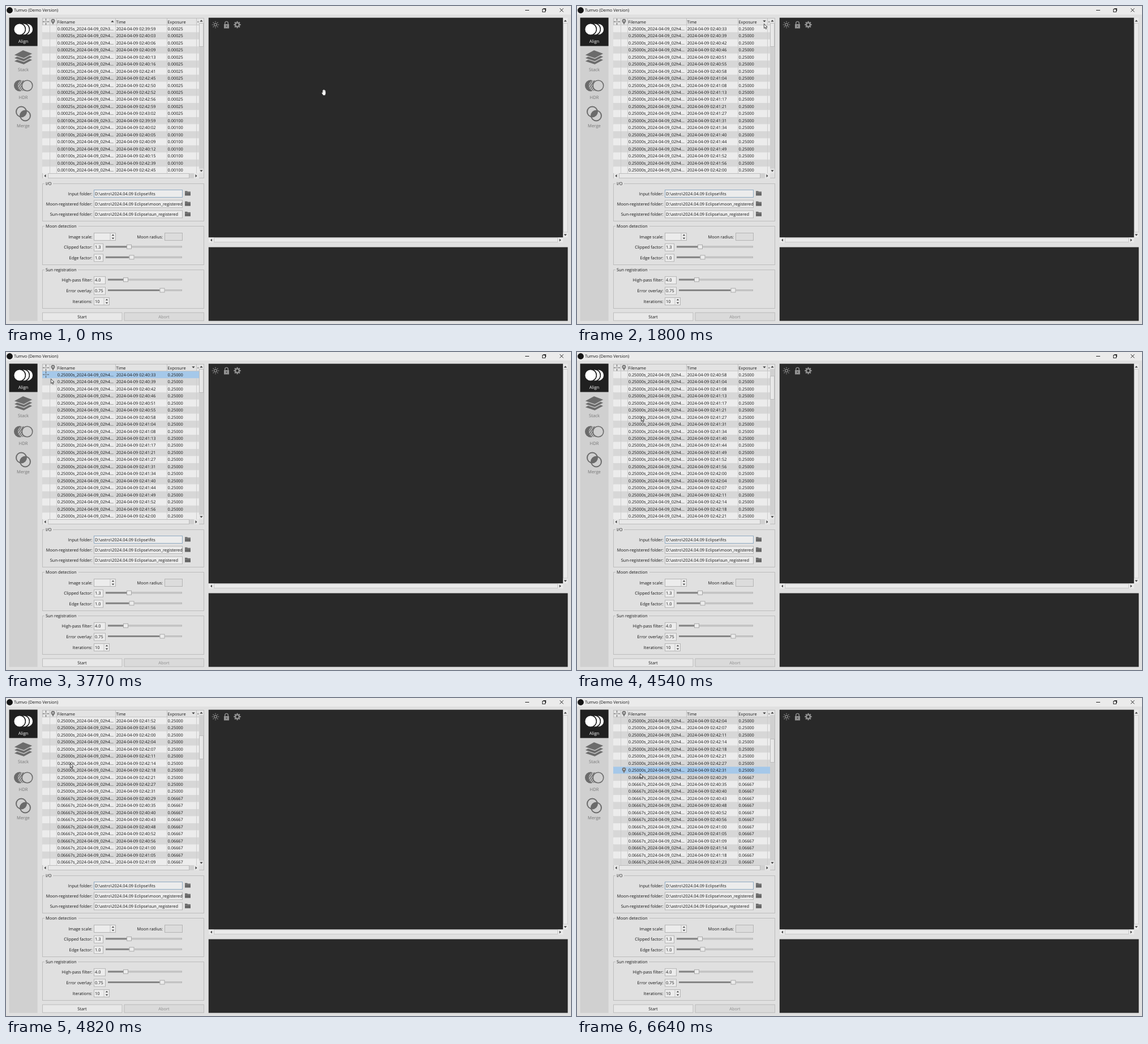
An HTML page with a canvas that plays this animation: 998 px wide and 561 px high, repeating every 6770 ms.

```html
<!DOCTYPE html>
<html lang="en">
<head>
<meta charset="utf-8">
<title>Eclipse alignment</title>
<style>
  html, body { margin: 0; width: 100%; height: 100%; overflow: hidden; background: #e0e0e0; }
  canvas { display: block; width: 100vw; height: 100vh; }
</style>
</head>
<body>
<canvas id="stage"></canvas>
<script>
const W = 998, H = 561, LOOP = 6770;
const canvas = document.getElementById('stage');
const ctx = canvas.getContext('2d');
const ratio = window.devicePixelRatio || 1;
canvas.width = W * ratio;
canvas.height = H * ratio;
ctx.scale(ratio, ratio);
ctx.textRendering = 'geometricPrecision';

const BG = '#e0e0e0', SIDE = '#d0d0d0', DARK = '#292929', INK = '#161616', GREY = '#6b6b6b', LINE = '#bcbcbc';

// Table contents: exposure followed by minutes and seconds of each shot
const shots = (exposure, minutes) => minutes.split(' ').flatMap(group => {
  const [minute, seconds] = group.split(':');
  return seconds.split(',').map(s => ({ exposure, time: `02:${minute}:${s}` }));
});
const ascending = [
  ...shots('0.00025', '39:59 40:03,06,09,13,16 42:41,45,50,52,56,59 43:02'),
  ...shots('0.00100', '39:59 40:02,05,09,12,15 42:39,45')
];
const descending = [
  ...shots('0.25000', '40:33,39,42,46,51,55,58 41:04,08,13,17,21,27,31,34,40,44,49,52,56 42:00,04,07,11,14,18,21,27,31'),
  ...shots('0.06667', '40:29,35,40,43,48,52,56 41:00,05,09,14,18,23')
];

// Pointer path: time, x, y
const path = [
  [0, 557, 147], [70, 553, 145], [700, 334, 40], [1050, 330, 31], [2200, 330, 31],
  [2930, 101, 42], [3000, 92, 42], [3280, 75, 43], [3700, 75, 43], [3770, 79, 47],
  [4330, 113, 114], [4540, 113, 114], [4820, 113, 115], [5090, 113, 120],
  [5400, 103, 138], [5710, 86, 134], [6440, 86, 128], [6640, 111, 133], [LOOP, 111, 133]
];
const scrollTimes = [4400, 4540, 4610, 4680, 4750, 4820, 4950];

function pointerAt(t) {
  const i = Math.max(1, path.findIndex(p => p[0] > t));
  const [t0, x0, y0] = path[i - 1], [t1, x1, y1] = path[i];
  let u = (t - t0) / (t1 - t0);
  if (t1 - t0 > 500) u = u * u * (3 - 2 * u);
  return [x0 + (x1 - x0) * u, y0 + (y1 - y0) * u];
}

function rect(x, y, w, h, fill, stroke) {
  if (fill) { ctx.fillStyle = fill; ctx.fillRect(x, y, w, h); }
  if (stroke) {
    ctx.strokeStyle = stroke;
    ctx.lineWidth = 1;
    ctx.strokeRect(x + .5, y + .5, w - 1, h - 1);
  }
}
function text(str, x, centerY, color = INK, align = 'left', size = 7.4) {
  ctx.font = `${size}px "Open Sans", "Noto Sans", sans-serif`;
  ctx.textAlign = align;
  ctx.fillStyle = color;
  ctx.fillText(str, x, centerY + size * .35);
}
function shape(points, fill, stroke, width = 1) {
  ctx.beginPath();
  points.forEach(([x, y]) => ctx.lineTo(x, y));
  ctx.closePath();
  if (fill) { ctx.fillStyle = fill; ctx.fill(); }
  if (stroke) { ctx.strokeStyle = stroke; ctx.lineWidth = width; ctx.stroke(); }
}
function line(x0, y0, x1, y1, color, width = 1) {
  ctx.beginPath();
  ctx.moveTo(x0, y0);
  ctx.lineTo(x1, y1);
  ctx.strokeStyle = color;
  ctx.lineWidth = width;
  ctx.stroke();
}
function circle(x, y, r, fill, stroke, width = 1) {
  ctx.beginPath();
  ctx.arc(x, y, r, 0, Math.PI * 2);
  if (fill) { ctx.fillStyle = fill; ctx.fill(); }
  if (stroke) { ctx.strokeStyle = stroke; ctx.lineWidth = width; ctx.stroke(); }
}
function clipped(makePath, draw) {
  ctx.save();
  ctx.beginPath();
  makePath();
  ctx.clip();
  draw();
  ctx.restore();
}
// Small triangle; (dx, dy) is the direction it points to
function triangle(x, y, dx, dy, r = 2.6, color = '#3a3a3a') {
  const h = r * .55;
  shape([[x + dx * h, y + dy * h], [x - dx * h + dy * r, y - dy * h + dx * r],
         [x - dx * h - dy * r, y - dy * h - dx * r]], color);
}
function spokes(x, y, count, from, to, color, width) {
  for (let i = 0; i < count; i++) {
    const a = i * Math.PI * 2 / count, c = Math.cos(a), s = Math.sin(a);
    line(x + c * from, y + s * from, x + c * to, y + s * to, color, width);
  }
}
function crosshair(x, y) {
  spokes(x, y, 4, 2, 5.5, '#555', 1);
  circle(x, y, .8, '#555');
}
function pin(x, y) {
  shape([[x - 3, y - .5], [x + 3, y - .5], [x, y + 5.2]], '#777');
  circle(x, y - 1.6, 3.4, '#777');
  circle(x, y - 1.6, 1.2, '#ddd');
}

function titleBar() {
  rect(0, 0, W, 15, '#ebebeb');
  circle(6.5, 7.5, 5.4, '#151515');
  text('Tumvo (Demo Version)', 14, 7.5);
  line(917, 7.5, 924, 7.5, '#222');
  rect(949, 4, 5, 5, null, '#333');
  rect(947, 5, 6, 6, '#ebebeb', '#333');
  line(978.3, 4.2, 984.5, 10.4, '#222');
  line(978.3, 10.4, 984.5, 4.2, '#222');
}

function sidebar() {
  rect(5.6, 20.6, 50, 535, SIDE);
  rect(5.6, 20.6, 50, 50, '#202020');
  for (const x of [37.5, 31, 24]) circle(x, 41, 10.4, '#fff', '#202020', 1.6);
  for (const y of [97, 91.5, 86])
    shape([[13.5, y + .5], [30, y - 8.5], [47.5, y - 2], [31.5, y + 6.5]], GREY, SIDE, 1.2);

  // Solid, hatched and hollow discs, each covering part of the one before
  circle(24, 140.5, 10, GREY);
  circle(31, 140.5, 10, SIDE);
  clipped(() => ctx.arc(31, 140.5, 9.5, 0, 7), () => {
    for (let x = 12; x < 46; x += 3.4) line(x, 150, x + 12, 131, GREY, 1.5);
  });
  circle(37.5, 140.5, 9.3, SIDE, GREY, 1.6);

  clipped(() => ctx.arc(27, 186.5, 9, 0, 7), () => circle(34, 193.5, 9, GREY));
  circle(27, 186.5, 9, null, GREY, 2);
  circle(34, 193.5, 9, null, GREY, 2);

  [['Align', 62, '#fff'], ['Stack', 112, '#757575'], ['HDR', 161.7, '#757575'], ['Merge', 211.7, '#757575']]
    .forEach(([label, y, color]) => text(label, 30.5, y, color, 'center', 7.7));
}

function table(t) {
  const rows = t < 1800 ? ascending : descending;
  const offset = 3 * scrollTimes.filter(s => t >= s).length;
  const selected = t < 3420 ? -1 : t < 5840 ? 0 : 28;
  const pitch = 12.465, columns = [77, 89, 193, 284, 336];

  rect(64, 21, 286, 283, '#dedede', LINE);
  clipped(() => ctx.rect(64, 34, 277, 261), () => {
    for (let i = 0; i < 21; i++) {
      const index = offset + i, { exposure, time } = rows[index];
      const top = 34 + i * pitch, mid = top + 6.2, active = index === selected;
      rect(64, top, 277, pitch, active ? '#a5c8e9' : index % 2 ? '#d7d7d7' : '#ececec');
      if (!active) columns.forEach(x => line(x + .5, top, x + .5, top + pitch, '#cccccc'));
      text(`${exposure}s_2024-04-09_02h${time[3]}...`, 90.7, mid);
      text(`2024-04-09 ${time}`, 194.7, mid);
      text(exposure, 285.5, mid);
      if (index === 0 && t >= 3490) crosshair(70.5, mid - .3);
      if (index === 28 && t >= 6200) pin(83, mid);
    }
  });

  rect(65, 22, 276, 12, '#e3e3e3');
  columns.forEach(x => line(x + .5, 22, x + .5, 34, '#c2c2c2'));
  line(65, 33.5, 341, 33.5, '#c6c6c6');
  crosshair(70.5, 27.8);
  pin(83, 27.8);
  text('Filename', 90.5, 28);
  text('Time', 194.5, 28);
  text('Exposure', 285.5, 28);
  line(338, 28, 340.5, 28, '#555');
  triangle(t < 1460 ? 188 : 331, 27, 0, t < 1800 ? -1 : 1);

  rect(341, 22, 8, 273, SIDE);
  rect(341, 22, 8, 8, '#e6e6e6');
  rect(341, 287, 8, 8, '#e6e6e6');
  rect(341, 30 + 2 * offset, 8, 42, '#e8e8e8', LINE);
  triangle(345, 26, 0, -1);
  triangle(345, 291, 0, 1);
  rect(65, 295, 276, 9, SIDE);
  rect(65, 295, 9, 9, '#e6e6e6');
  rect(332, 295, 9, 9, '#e6e6e6');
  rect(74, 295, 250, 9, '#e8e8e8', LINE);
  triangle(69, 299.7, -1, 0);
  triangle(336, 299.7, 1, 0);
}

function group(title, y, height, titleWidth) {
  rect(64, y, 286, height, null, LINE);
  rect(68, y - 1, titleWidth, 3, BG);
  text(title, 70, y + .5);
}
function field(x, y, w, value = '', border = '#b4b4b4', fill = '#ececec') {
  rect(x, y - 7, w, 14, fill, border);
  clipped(() => ctx.rect(x + 1, y - 7, w - 1, 14), () => text(value, x + 2, y));
}
const label = (str, y, x = 152.5) => text(str, x, y, INK, 'right');
function spin(y, w, value) {
  field(155, y, w, value);
  const x = 155 + w - 5;
  line(x - 5, y - 6, x - 5, y + 6, '#c4c4c4');
  triangle(x, y - 3, 0, -1, 2.2);
  triangle(x, y + 3, 0, 1, 2.2);
}
function slider(name, y, value, boxWidth, start, knob) {
  label(name, y);
  field(155, y, boxWidth, value);
  rect(start, y - 2.5, 311 - start, 3, '#cfcfcf', '#b8b8b8');
  rect(start, y - 2.5, knob - start, 3, '#858585');
  rect(knob - 4.5, y - 5, 9, 8, '#ececec', '#a8a8a8');
}
function folder(y) {
  rect(316, y - 4, 4.5, 2, '#666');
  rect(316, y - 3, 10, 7, '#666');
  line(316, y - 1.4, 326, y - 1.4, '#999', .6);
}
function button(x, str, fill, color) {
  rect(x, 540.5, 141.5, 15, fill, LINE);
  text(str, x + 70.5, 548.2, color, 'center');
}

function settings() {
  group('I/O', 313, 67, 15);
  [['Input folder:', 'fits'], ['Moon-registered folder:', 'moon_registered'], ['Sun-registered folder:', 'sun_registered']]
    .forEach(([name, leaf], i) => {
      const y = 331 + i * 18.2;
      label(name, y);
      field(155, y, 157, 'D:\\astro\\2024.04.09 Eclipse\\' + leaf, i ? '#b4b4b4' : '#8faac2');
      folder(y - .5);
    });

  group('Moon detection', 388, 69, 60);
  label('Image scale:', 407);
  spin(407, 39, '');
  label('Moon radius:', 407, 277);
  field(280, 407, 32, '', '#b4b4b4', '#dcdcdc');
  slider('Clipped factor:', 425.8, '1.3', 17, 176, 217.5);
  slider('Edge factor:', 444.3, '1.0', 17, 176, 222);

  group('Sun registration', 465, 69, 59);
  slider('High-pass filter:', 483.8, '4.0', 21, 180, 211.5);
  slider('Error overlay:', 502.5, '0.75', 21, 180, 276);
  label('Iterations:', 521);
  spin(521, 28, '10');

  button(64, 'Start', '#e8e8e8', INK);
  button(208.5, 'Abort', '#dadada', '#8c8c8c');
}

function viewer() {
  const icon = '#929292', bar = '#eaeaea';
  rect(984, 21, 8, 387, bar);
  rect(358, 408, 626, 9, bar);
  rect(984, 30, 8.5, 369.5, bar, '#c8c8c8');
  rect(367, 408.5, 608, 8.5, bar, '#c8c8c8');
  rect(357.8, 20.7, 626, 387.5, DARK);
  rect(357.8, 425.5, 634.5, 130, DARK);
  triangle(988, 26, 0, -1);
  triangle(988, 404, 0, 1);
  triangle(362.5, 413, -1, 0);
  triangle(979, 413, 1, 0);

  circle(370, 33, 2.4, null, icon, 1.2);
  spokes(370, 33, 8, 4.2, 6.3, icon, 1.1);
  rect(385, 32, 9, 7.5, icon);
  ctx.beginPath();
  ctx.arc(389.5, 30.2, 2.8, Math.PI, 0);
  ctx.lineTo(392.3, 33);
  ctx.moveTo(386.7, 30.2);
  ctx.lineTo(386.7, 33);
  ctx.strokeStyle = icon;
  ctx.lineWidth = 1.4;
  ctx.stroke();
  circle(389.5, 35.6, 1, DARK);
  spokes(408.5, 33, 8, 3.5, 6.2, icon, 2.2);
  circle(408.5, 33, 3.4, null, icon, 2.4);
}

function pointer(t) {
  const [x, y] = pointerAt(t);
  ctx.save();
  ctx.translate(x, y);
  if (x > 358) {
    shape([[0, 5.8], [1, 5.2], [2, 6], [2, 1.6], [3.4, 1], [4.4, .3], [5.6, 1], [7.6, 2], [8, 7], [6.8, 10.8], [3.2, 10.8]],
      '#f6f6f6', '#111', .6);
    for (const fx of [3.6, 5.1, 6.5]) line(fx, 1.6, fx, 4.5, '#aaa', .35);
  } else {
    shape([[.4, .4], [.4, 8.4], [2.2, 6.8], [3.5, 9.7], [4.8, 9.1], [3.5, 6.3], [6, 6.1]], '#f2f2f2', '#222', .8);
  }
  ctx.restore();
}

function render(now) {
  const t = now % LOOP;
  rect(0, 0, W, H, BG);
  titleBar();
  sidebar();
  table(t);
  settings();
  viewer();
  pointer(t);
}

let begin;
function tick(now) {
  begin ??= now;
  render(now - begin);
  requestAnimationFrame(tick);
}
render(0);
requestAnimationFrame(tick);
</script>
</body>
</html>
```
